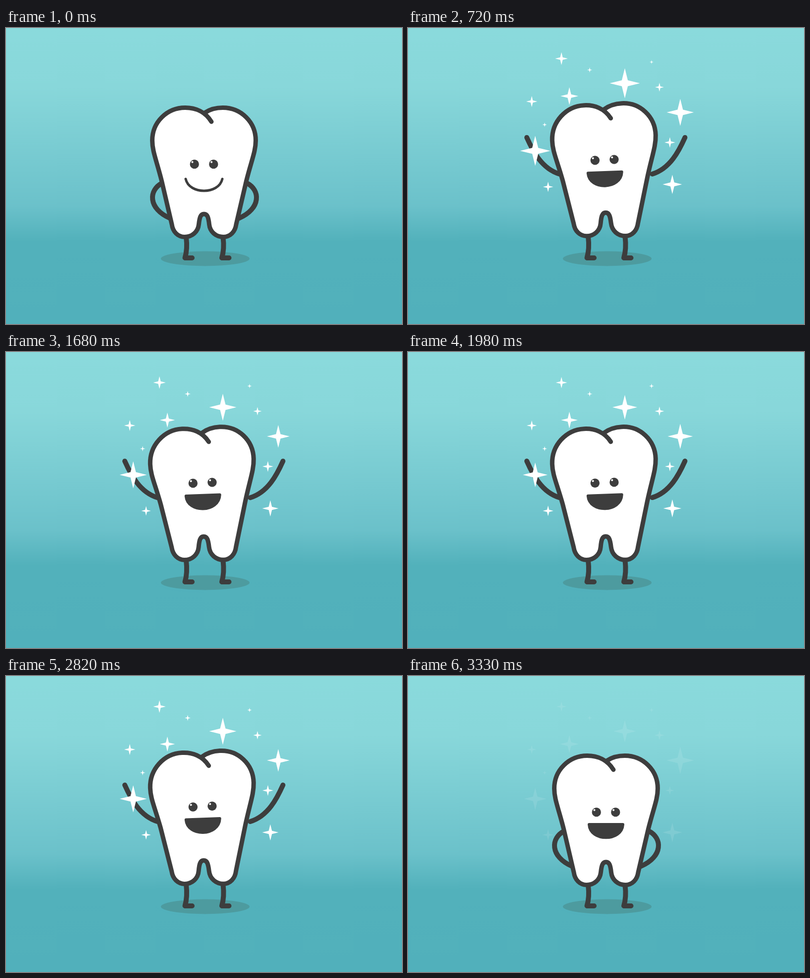
Animation, 800 px wide and 600 px high, one loop 3.39 s. Source, as an HTML page with a canvas:

```html
<!DOCTYPE html>
<html lang="en">
<head>
<meta charset="utf-8">
<title>Happy tooth</title>
<style>
  html, body { margin: 0; width: 100%; height: 100%; overflow: hidden; }
  canvas { display: block; }
</style>
</head>
<body>
<canvas id="stage" width="800" height="600"></canvas>
<script>
const ctx = document.getElementById('stage').getContext('2d');
const LOOP = 3390, INK = '#3d3d3d';

// Left arm as cubic curves: on the hip, half raised, up
const ARM = [
  [316, 314, 288, 328, 286, 366, 332, 386],
  [314, 324, 296, 350, 256, 354, 279, 284],
  [306, 295, 270, 284, 252, 248, 240, 221]];

// x, y, size
const STARS = [
  [438, 112, 25], [550, 171, 25.5], [257, 249, 25], [326, 138, 17], [310, 62, 11.5],
  [534, 317, 18.3], [250, 149, 10.3], [283, 322, 10.8], [529, 232, 10], [508, 120, 9.5],
  [367, 85, 5.5], [492, 69, 5], [276, 196, 5]];

const BODY = 'M415 190 C403 170 383 161.5 362 161.5 C325 161.5 295.5 191 295.5 228 ' +
  'C295.5 250 304 268 314.5 310 L335 398 C337 413 347 423.5 361 423.5 ' +
  'C376 423.5 388 413 389.5 398 C391 384 393 377 400 377 C407 377 409 384 410.5 398 ' +
  'C412 413 424 423.5 439 423.5 C453 423.5 463 413 465 398 L485.5 310 ' +
  'C496 268 504.5 250 504.5 228 C504.5 191 475 161.5 438 161.5 C424 161.5 411 165.5 402 171.5';
const SMILE = 'M363 306 C370 338 430 338 437 306';
const LAUGH = 'M366 301 L434 301 C432 336 368 336 366 301 Z';

const ramp = (t, from, to) => Math.max(0, Math.min(1, (t - from) / (to - from)));
const ease = (t, from, to) => (1 - Math.cos(Math.PI * ramp(t, from, to))) / 2;
const pulse = (t, from, to) => Math.sin(Math.PI * ramp(t, from, to)) ** 2;
const wave = (t, peak, period) => Math.cos(2 * Math.PI * (t - peak) / period);

function backOut(p) {
  const q = p - 1;
  return 1 + 3.2 * q ** 3 + 2.2 * q ** 2;
}

// Stretch and lean a point of the tooth, holding its roots nearly still
function bend(x, y, { lift, tilt }) {
  const u = ramp(y, 430, 160);
  return [
    x - 6.3 * u ** 1.4 * tilt,
    y - (2 + 6 * u) * lift - .052 * Math.min(1, 1.5 * u) * tilt * (x - 400)
  ];
}

function bentPath(d, pose, dy = 0) {
  return new Path2D(d.replace(/([\d.]+) ([\d.]+)/g, (_, px, py) => {
    const [x, y] = bend(+px, +py, pose);
    return `${x} ${y + dy}`;
  }));
}

function stroke(path, width) {
  ctx.lineWidth = width;
  ctx.stroke(path);
}

function disc(x, y, r, color) {
  ctx.fillStyle = color;
  ctx.beginPath();
  ctx.arc(x, y, r, 0, 7);
  ctx.fill();
}

const sky = ctx.createLinearGradient(0, 0, 0, 600);
[[0, '#8adadc'], [120, '#88d7da'], [360, '#6bc1ca'], [432, '#52b1bb'], [600, '#51b0bb']]
  .forEach(([y, color]) => sky.addColorStop(y / 600, color));

// swing runs 0..2 through the arm poses; the hand arcs outwards on the upper half
function drawArm(swing, dy, mirror) {
  const i = swing < 1 ? 0 : 1, k = swing - i;
  const arc = i * 28 * Math.sin(Math.PI * k);
  const c = ARM[i].map((v, n) => {
    const p = v + (ARM[i + 1][n] - v) * k;
    if (n % 2) return p + dy;
    const x = p - arc * n / 6;
    return mirror ? mirror - x : x;
  });
  stroke(new Path2D(`M${c[0]} ${c[1]} C${c.slice(2).join(' ')}`), 10);
}

function drawLeg(x, lift) {
  const knee = x + 3 - 5 * Math.max(0, -lift);
  stroke(new Path2D(`M${x} ${424 - 2 * lift} Q${knee} 448 ${x - 2.5} 466 h14.5`), 10);
}

function drawStar(x, y, r) {
  ctx.beginPath();
  for (let i = 0; i < 8; i++) {
    const d = i % 2 ? r * .28 : r, a = i * Math.PI / 4;
    ctx.lineTo(x + d * Math.cos(a), y + d * Math.sin(a));
  }
  ctx.fill();
}

function draw(t) {
  const crouch = .6 * pulse(t, 60, 400) + .5 * pulse(t, 3000, 3320);
  const up = ease(t, 360, 640) - ease(t, 2850, 3150) - crouch;
  const bob = wave(t, 982, 855);
  const pose = {
    lift: up * (.907 + .158 * bob),
    tilt: ease(t, 200, 560) - ease(t, 2850, 3180)
  };
  const faceY = -up * (4.7 + 2.2 * bob);
  const armY = (.6 - bob) * up;
  const swing = 2 * (ease(t, 140, 700) - ease(t, 2850, 3280));

  ctx.fillStyle = sky;
  ctx.fillRect(0, 0, 800, 600);
  ctx.fillStyle = '#4d9b9f';
  ctx.beginPath();
  ctx.ellipse(402.5, 467.5, 89.5, 15, 0, 0, 7);
  ctx.fill();

  ctx.strokeStyle = INK;
  ctx.lineCap = ctx.lineJoin = 'round';
  drawLeg(364, pose.lift);
  drawLeg(438.5, pose.lift);
  drawArm(swing, armY);
  drawArm(swing, armY + 14 * pulse(t, 250, 590), 802 - 2.5 * pose.tilt);

  const body = bentPath(BODY, pose);
  ctx.fillStyle = '#fff';
  ctx.fill(body);
  stroke(body, 9);

  for (const eyeX of [380.7, 419.3]) {
    const [x, y] = bend(eyeX, 276, pose);
    disc(x, y + faceY, 9.2, INK);
    disc(x - 4.2, y + faceY - 4.3, 2, '#fff');
  }
  if (t < 510) {
    stroke(bentPath(SMILE, pose, faceY), 5);
  } else {
    const mouth = bentPath(LAUGH, pose, faceY);
    ctx.fillStyle = INK;
    ctx.fill(mouth);
    stroke(mouth, 6);
  }

  // Big stars pop first; neighbours twinkle in turn
  ctx.fillStyle = '#fff';
  ctx.globalAlpha = 1 - ramp(t, 3232, 3342);
  STARS.forEach(([x, y, size], i) => {
    const delay = 660 - 7 * size;
    if (t <= delay) return;
    const twinkle = 1 - .1 * (-1) ** i * wave(t, 1130, 1140);
    drawStar(x, y, size * twinkle * backOut(ramp(t, delay, delay + 400)));
  });
  ctx.globalAlpha = 1;
}

function tick() {
  draw(performance.now() % LOOP);
  requestAnimationFrame(tick);
}
tick();
</script>
</body>
</html>
```
